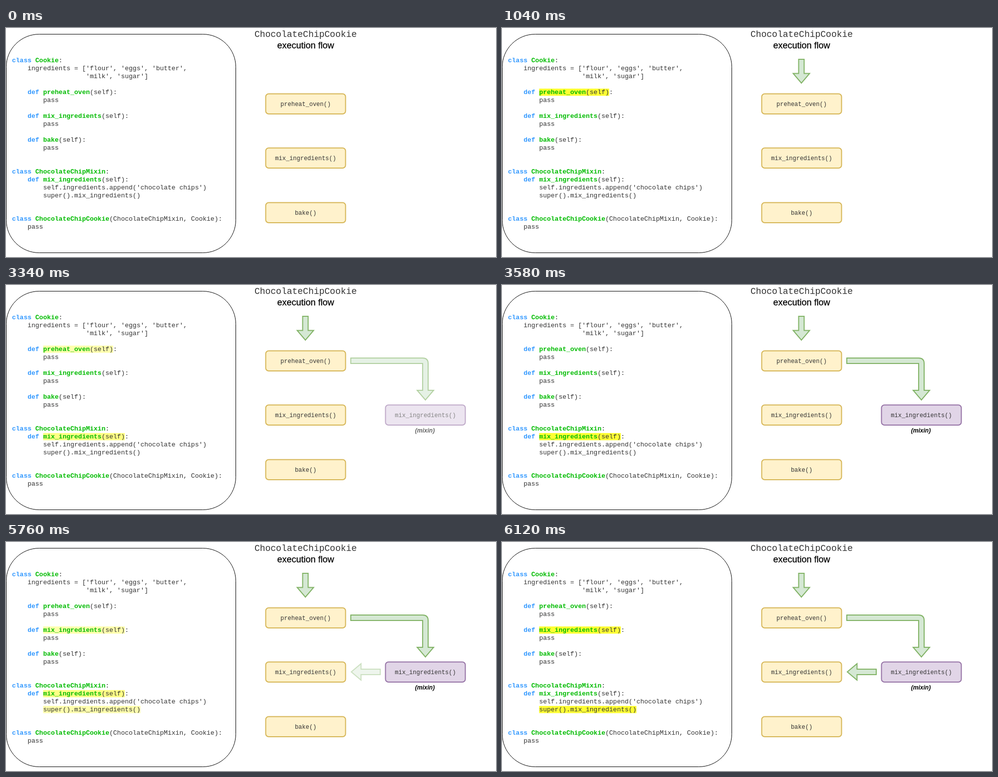
These frames come from a looping animation (982x461 px, 8 s). An HTML page with a canvas:

```html
<!DOCTYPE html>
<html lang="en">
<head>
<meta charset="utf-8">
<title>Mixin execution flow</title>
<style>
html, body { margin: 0; width: 100%; height: 100%; overflow: hidden; background: #fff; }
canvas { display: block; }
</style>
</head>
<body>
<canvas id="stage" width="982" height="461"></canvas>
<script>
const W = 982, H = 461, LOOP = 8000;
const MONO = '"Courier New", "Liberation Mono", monospace';
const SANS = 'Helvetica, Arial, "Liberation Sans", sans-serif';
const INK = '#333', NAME = '#00bb00', KEYWORD = '#3399ff';
const GREEN = ['#d5e8d4', '#82b366'];
const YELLOW = ['#fff2cc', '#d6b656'];
const PURPLE = ['#e1d5e7', '#9673a6'];

const CODE = `class Cookie:
    ingredients = ['flour', 'eggs', 'butter',
                   'milk', 'sugar']

    def preheat_oven(self):
        pass

    def mix_ingredients(self):
        pass

    def bake(self):
        pass


class ChocolateChipMixin:
    def mix_ingredients(self):
        self.ingredients.append('chocolate chips')
        super().mix_ingredients()


class ChocolateChipCookie(ChocolateChipMixin, Cookie):
    pass`.split('\n');

const CODE_X = 12, CHAR = 7.8;
const lineY = i => Math.round(69.4 + i * 15.95);

// Highlighted [line, first column, length] for each stage of the flow
const MARKS = [
  [],
  [[4, 8, 18]],
  [[15, 8, 21]],
  [[7, 8, 21], [17, 8, 25]]
];
const FADES = [500, 3040, 5580], STEP = 60, STEPS = 10;

function text(c, str, x, y, font, color = INK, align = 'center') {
  c.font = font;
  c.fillStyle = color;
  c.textAlign = align;
  c.fillText(str, x, y);
}

function paint(c, [fill, line]) {
  c.fillStyle = fill;
  c.strokeStyle = line;
  c.lineWidth = 2;
  c.fill();
  c.stroke();
}

function box(c, x, y, label, colors) {
  c.beginPath();
  c.roundRect(x, y, 160, 40.5, 6);
  paint(c, colors);
  text(c, label, x + 80, y + 24.5, '12px ' + MONO);
}

// Straight arrow of the given length, pointing along angle, ending at its tip
function arrow(c, x, y, length, angle) {
  const neck = -19.5;
  c.save();
  c.translate(x, y);
  c.rotate(angle);
  c.beginPath();
  c.moveTo(-length, -5.5);
  c.lineTo(neck, -5.5);
  c.lineTo(neck, -16.5);
  c.lineTo(0, 0);
  c.lineTo(neck, 16.5);
  c.lineTo(neck, 5.5);
  c.lineTo(-length, 5.5);
  c.closePath();
  paint(c, GREEN);
  c.restore();
}

function elbow(c) {
  c.beginPath();
  c.moveTo(691, 147);
  c.lineTo(835, 147);
  c.quadraticCurveTo(846, 147, 846, 158);
  c.lineTo(846, 212);
  c.lineTo(857, 212);
  c.lineTo(840.5, 231.5);
  c.lineTo(824, 212);
  c.lineTo(835, 212);
  c.lineTo(835, 158);
  c.lineTo(691, 158);
  c.closePath();
  paint(c, GREEN);
}

function codeLine(c, str, i) {
  const y = lineY(i);
  const put = (s, col, color, bold) =>
    text(c, s, CODE_X + col * CHAR, y, (bold ? 'bold ' : '') + '13px ' + MONO, color, 'left');
  const m = str.match(/^( *)(class|def) (\w+)(.*)$/);
  if (!m) {
    const indent = str.search(/\S|$/);
    put(str.slice(indent), indent, INK);
    return;
  }
  const start = m[1].length;
  const name = start + m[2].length + 1;
  put(m[2], start, KEYWORD, true);
  put(m[3], name, NAME, true);
  put(m[4], name + m[3].length, INK);
}

function makeScene(stage) {
  const canvas = document.createElement('canvas');
  canvas.width = W;
  canvas.height = H;
  const c = canvas.getContext('2d');
  c.fillStyle = '#fff';
  c.fillRect(0, 0, W, H);

  c.beginPath();
  c.roundRect(0.5, 12.5, 460, 440, 66);
  c.strokeStyle = '#000';
  c.lineWidth = 1;
  c.stroke();

  c.fillStyle = '#ffff33';
  for (const [line, col, len] of MARKS[stage])
    c.fillRect(CODE_X + col * CHAR, lineY(line) - 11, len * CHAR, 14.5);
  CODE.forEach((str, i) => codeLine(c, str, i));

  text(c, 'ChocolateChipCookie', 600.5, 18, '18px ' + MONO);
  text(c, 'execution flow', 600.5, 41, '18px ' + SANS, '#000');
  c.lineWidth = 0.25;
  c.strokeText('execution flow', 600.5, 41);

  box(c, 520.5, 132.5, 'preheat_oven()', YELLOW);
  box(c, 520.5, 241.5, 'mix_ingredients()', YELLOW);
  box(c, 520.5, 351.5, 'bake()', YELLOW);

  if (stage > 0) arrow(c, 600, 111, 48, Math.PI / 2);
  if (stage > 1) {
    elbow(c);
    box(c, 760.5, 241.5, 'mix_ingredients()', PURPLE);
    text(c, '(mixin)', 839.5, 297, 'italic bold 12px ' + SANS, '#000');
  }
  if (stage > 2) arrow(c, 692, 261.5, 58, Math.PI);
  return canvas;
}

const scenes = MARKS.map((_, i) => makeScene(i));
const ctx = document.getElementById('stage').getContext('2d');

function draw(t) {
  ctx.globalAlpha = 1;
  ctx.drawImage(scenes[0], 0, 0);
  FADES.forEach((start, i) => {
    if (t < start) return;
    const step = Math.floor((t - start) / STEP) + 1;
    ctx.globalAlpha = Math.min(step / STEPS, 1);
    ctx.drawImage(scenes[i + 1], 0, 0);
  });
}

function tick() {
  draw(performance.now() % LOOP);
  requestAnimationFrame(tick);
}
tick();
</script>
</body>
</html>
```
